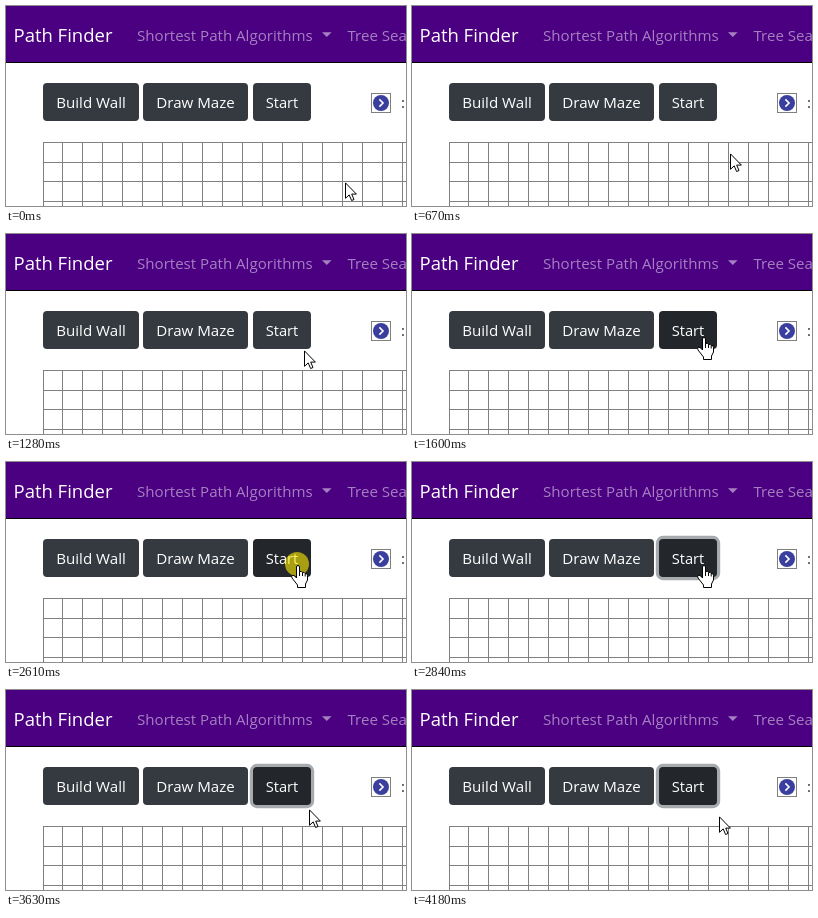
An HTML page that plays this animation: 400x200 px, repeating every 4.49 s.

```html
<!DOCTYPE html>
<html lang="en">
<head>
<meta charset="utf-8">
<title>Path Finder</title>
<style>
  html, body { margin: 0; width: 100%; height: 100%; overflow: hidden; background: #fff; }
  svg { display: block; position: absolute; left: 0; top: 0; }
  text { font: 15.1px "Open Sans", "Noto Sans", sans-serif; fill: #fff; }
  .brand { font-size: 18.5px; }
  .nav text, .nav path { fill: #a580c1; }
  .buttons { fill: #343a40; }
  .buttons text { text-anchor: middle; }
  .grid { fill: none; stroke: #808080; shape-rendering: crispEdges; }

  #start, #ring, #click, #cursor, #arrow, #hand { animation: 4490ms step-end infinite; }
  #start { animation-name: hover; }
  #ring { animation-name: focus; }
  #click { animation-name: click; }
  #cursor { position: absolute; animation-name: move; }
  #arrow { animation-name: arrow; }
  #hand { left: -6px; animation-name: hand; }
  #cursor path { fill: #fff; stroke: #000; }

  @keyframes hover { 0% { fill: #343a40; } 32.29%, 100% { fill: #23272b; } }
  @keyframes focus { 0% { opacity: 0; } 61.46% { opacity: .5; } 63.25%, 100% { opacity: 1; } }
  @keyframes click { 0% { opacity: 0; } 58.12% { opacity: 1; } 61.46%, 100% { opacity: 0; } }
  @keyframes arrow { 0% { opacity: 1; } 32.29% { opacity: 0; } 79.06%, 100% { opacity: 1; } }
  @keyframes hand { 0% { opacity: 0; } 32.29% { opacity: 1; } 79.06%, 100% { opacity: 0; } }

  /* hotspot of the pointer */
  @keyframes move {
    0% { left: 339px; top: 176px; }
    10.02% { left: 336px; top: 173px; animation-timing-function: steps(3); }
    14.92% { left: 318px; top: 147px; animation-timing-function: steps(3); }
    20.04% { left: 310px; top: 131px; }
    22.04% { left: 308px; top: 129px; animation-timing-function: steps(4); }
    28.5% { left: 298px; top: 116px; }
    30.73% { left: 296px; top: 113px; }
    32.29% { left: 294px; top: 109px; animation-timing-function: steps(2); }
    35.63% { left: 291px; top: 103px; }
    72.16% { left: 293px; top: 104px; }
    73.71% { left: 295px; top: 107px; animation-timing-function: steps(5); }
    82.62% { left: 305px; top: 122px; }
    84.18% { left: 306px; top: 125px; }
    85.96% { left: 307px; top: 128px; }
    93.09%, 100% { left: 307px; top: 126px; }
  }
</style>
</head>
<body>
<svg width="400" height="200" viewBox="0 0 400 200">
  <rect width="400" height="56" fill="#4b0082"/>
  <rect y="56" width="400" height="1"/>
  <text class="brand" x="7.5" y="36">Path Finder</text>
  <g class="nav">
    <text x="131" y="34.5">Shortest Path Algorithms</text>
    <path d="M316 26.2h9.6l-4.8 4.8z"/>
    <text x="341.5" y="34.5">Tree Search</text>
  </g>

  <g class="buttons">
    <rect x="37" y="77" width="96" height="38" rx="4"/>
    <text x="85" y="102">Build Wall</text>
    <rect x="137" y="77" width="105" height="38" rx="4"/>
    <text x="189.5" y="102">Draw Maze</text>
    <rect id="ring" x="243.8" y="73.8" width="64.4" height="44.4" rx="7.2" fill="#a8abae"/>
    <rect id="start" x="247" y="77" width="58" height="38" rx="4"/>
    <text x="276" y="102" style="font-size:14.7px">Start</text>
  </g>

  <rect x="365.5" y="87.5" width="19" height="19" fill="#fff" stroke="#808080"/>
  <circle cx="375" cy="97" r="8" fill="#3a3f9e"/>
  <path d="M373.4 93.4l3.6 3.6-3.6 3.6" fill="none" stroke="#fff" stroke-width="1.6"/>
  <text x="395" y="102" style="fill:#212529">:</text>

  <g class="grid">
    <path d="M37.5 136V200M37 136.5H400M37 156.5H400M37 175.5H400M37 195.5H400"/>
    <path d="M56 168H400" stroke-width="64" stroke-dasharray="1 19"/>
  </g>

  <circle id="click" cx="291" cy="102" r="12" fill="#ffee00" fill-opacity=".6"/>
</svg>

<div id="cursor">
  <svg id="arrow" width="13" height="20">
    <path d="M.5 .9V16.3L4.2 12.9L6.6 18.5L9 17.5L6.7 12.1H11.4Z"/>
  </svg>
  <svg id="hand" width="18" height="24">
    <path d="M5.5 13V2Q5.5 .5 7 .5T8.5 2V6.6Q10.6 5.8 11.5 7.4Q13.4 6.8 14.2 8.5Q16.5 8 16.5 10.5V15L14.5 19V22.5H6.5V20L1 13Q0 11 1.8 10.2Q3.2 10 5.5 13Z"/>
    <path d="M8.5 6.5V11M11.5 7.5V11M14.2 8.5V11.5"/>
  </svg>
</div>
</body>
</html>
```
